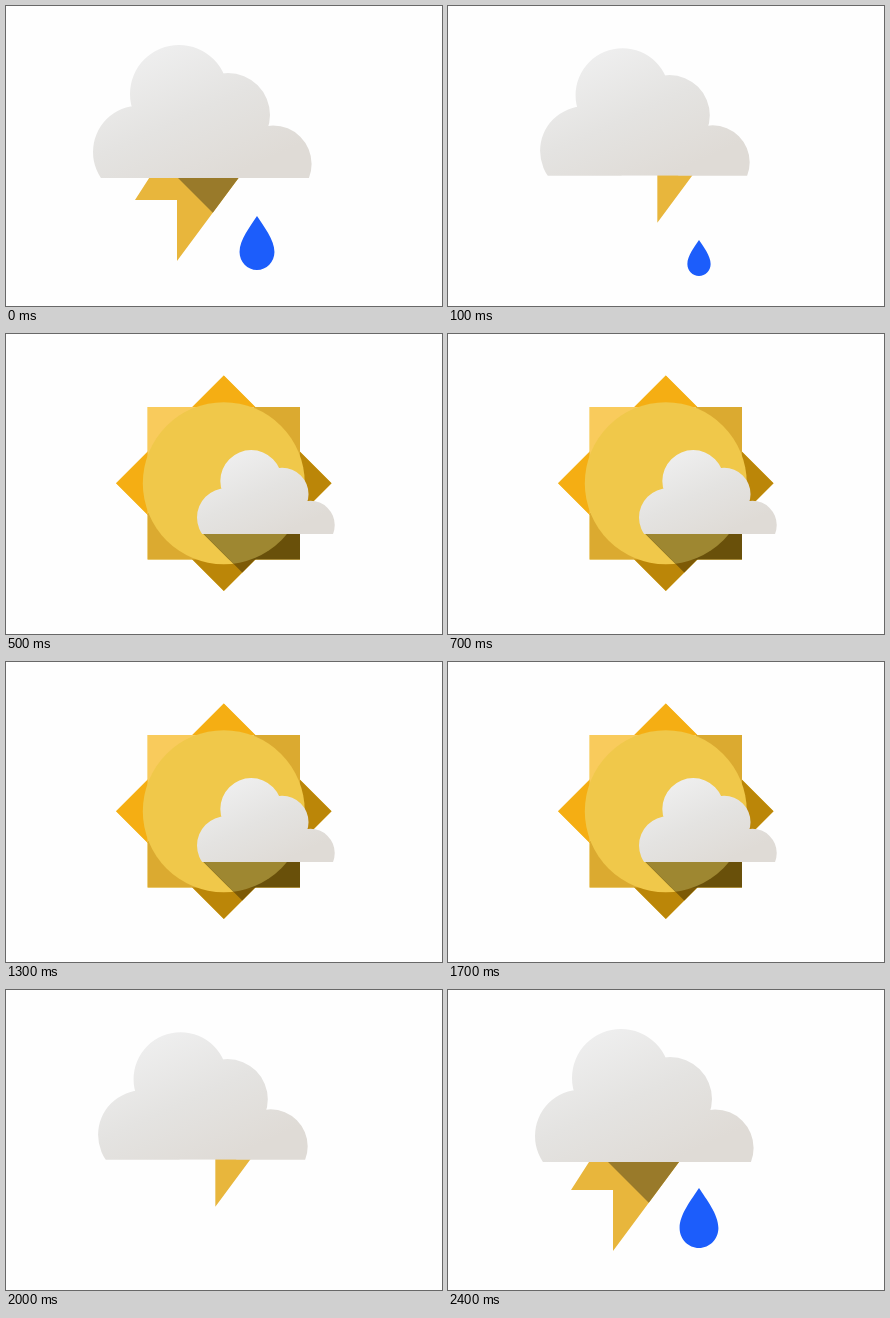
An HTML page with a canvas for the animation above (2.5 s loop, 436 by 300 pixels).

```html
<!DOCTYPE html>
<html lang="en">
<head>
<meta charset="utf-8">
<title>Weather icons</title>
<style>
html, body { margin: 0; width: 100%; height: 100%; overflow: hidden; background: #fefefe; }
canvas { display: block; width: 436px; height: 300px; }
</style>
</head>
<body>
<canvas id="stage" width="436" height="300"></canvas>
<script>
const ctx = document.getElementById('stage').getContext('2d');
const LOOP = 2500, STEP = 100;
const SUN = { x: 217.8, y: 149.2, r: 81, half: 76.2 };
const STORM = { x: 196.5, y: 105.5, scale: 1 };
const FAIR = { x: 260, y: 158, scale: 0.63 };

const mix = (a, b, k) => a + (b - a) * k;
const ramp = (v, a, b) => Math.min(1, Math.max(0, (v - a) / (b - a)));
const smooth = k => k * k * (3 - 2 * k);

function poly(points, fill) {
  ctx.beginPath();
  points.forEach(([x, y]) => ctx.lineTo(x, y));
  ctx.closePath();
  if (fill) { ctx.fillStyle = fill; ctx.fill(); }
}

function disc(x, y, r, fill) {
  ctx.beginPath();
  ctx.arc(x, y, r, 0, Math.PI * 2);
  ctx.fillStyle = fill;
  ctx.fill();
}

// Hard two-tone split along the diagonal.
function split(light, dark, p) {
  const h = SUN.half, g = ctx.createLinearGradient(-h, -h, h, h);
  g.addColorStop(p, light);
  g.addColorStop(p, dark);
  return g;
}

function star(scale, angle, back, front) {
  const h = SUN.half, d = h * Math.SQRT2;
  ctx.save();
  ctx.translate(SUN.x, SUN.y);
  ctx.rotate(angle);
  ctx.scale(scale, scale);
  poly([[0, -d], [d, 0], [0, d], [-d, 0]], back);
  poly([[-h, -h], [h, -h], [h, h], [-h, h]], front);
  ctx.restore();
}

function sun(u, pose) {
  const grow = ramp(u, 100, 400), rest = 1 - grow;
  if (!grow) return;
  const r = SUN.r * (1 - rest ** 3);
  const size = 1 - 0.855 * rest ** 2, angle = 0.93 * rest ** 2;
  const shade = ramp(u, 300, 400);
  ctx.save();
  ctx.globalAlpha = grow;
  star(size, angle, '#f2cb52', '#f2cb52');
  ctx.globalAlpha = shade;
  star(size, angle, split('#f5ae13', '#bb8608', 0.5), split('#f9cb5c', '#dbaa30', 0.35));
  ctx.globalAlpha = 1;
  disc(SUN.x, SUN.y, r, '#f0c84a');

  // Long shadow under the cloud, visible only on the sun.
  const x = pose.x - 99 * pose.scale, y = pose.y + 66.5 * pose.scale;
  poly([[x, y], [x + 140, y], [x + 140, y + 140]]);
  ctx.clip();
  ctx.globalAlpha = shade;
  star(size, angle, '#7d5a06', '#69500a');
  disc(SUN.x, SUN.y, r, '#9e8731');
  ctx.restore();
}

// Slides up along the diagonal until the cloud hides it.
function bolt(u, top) {
  const d = 6 * Math.exp(u / 50);
  if (d > 90) return;
  ctx.save();
  ctx.beginPath();
  ctx.rect(0, top, 436, 300);
  ctx.clip();
  ctx.translate(d, -d);
  poly([[165, 261], [165, 200], [123, 200], [187.3, 100], [284.4, 100]], '#e8b63c');
  ctx.clip();
  poly([[88, 100], [300, 100], [300, 312]], '#997a2a');
  ctx.restore();
}

// Falls steadily, largest one step before the loop ends.
function drop(t) {
  const w = (t < LOOP / 2 ? t : t - LOOP) / 100 + 1;
  const s = 1 - 0.1 * w * w;
  if (s <= 0) return;
  ctx.save();
  ctx.translate(251, 258 + 6 * w);
  ctx.scale(s, s);
  ctx.beginPath();
  ctx.moveTo(0, -60);
  ctx.bezierCurveTo(7, -49, 19.4, -34, 19.4, -20);
  ctx.bezierCurveTo(19.4, -9, 10.7, 0, 0, 0);
  ctx.bezierCurveTo(-10.7, 0, -19.4, -9, -19.4, -20);
  ctx.bezierCurveTo(-19.4, -34, -7, -49, 0, -60);
  ctx.fillStyle = '#1c5dfb';
  ctx.fill();
  ctx.restore();
}

function cloudPose(t, u) {
  const move = smooth(ramp(u, 85, 350));
  const shrink = ramp(u, 0, 300) ** 2;
  const swell = 0.015 * Math.sin(Math.PI * ramp(t, 2100, 2400));
  return {
    x: mix(STORM.x, FAIR.x, move),
    y: mix(STORM.y, FAIR.y, move),
    scale: mix(STORM.scale, FAIR.scale, shrink) + swell
  };
}

function cloud({ x, y, scale }) {
  ctx.save();
  ctx.translate(x, y);
  ctx.scale(scale, scale);
  ctx.translate(-STORM.x, -STORM.y);
  ctx.beginPath();
  ctx.rect(80, 30, 235, 142);
  ctx.clip();
  const g = ctx.createLinearGradient(160, 40, 220, 172);
  g.addColorStop(0, '#eeeeee');
  g.addColorStop(0.5, '#e4e3e1');
  g.addColorStop(1, '#dfdbd6');
  ctx.beginPath();
  [[133.5, 146, 46.5], [173, 88, 49], [222, 109, 42], [267, 158, 38.6]].forEach(([cx, cy, r]) => {
    ctx.moveTo(cx + r, cy);
    ctx.arc(cx, cy, r, 0, Math.PI * 2);
  });
  ctx.rect(134, 120, 124, 52);
  ctx.fillStyle = g;
  ctx.fill();
  ctx.restore();
}

function draw(now) {
  const t = Math.floor((now % LOOP) / STEP) * STEP;
  // Time into the change to sun; the change back runs the same way in reverse.
  const u = t < 1200 ? t : 2100 - t;
  const pose = cloudPose(t, u);
  ctx.fillStyle = '#fefefe';
  ctx.fillRect(0, 0, 436, 300);
  sun(u, pose);
  bolt(u, pose.y + 60 * pose.scale);
  drop(t);
  cloud(pose);
}

let start = null;
function tick(now) {
  if (start === null) start = now;
  draw(now - start);
  requestAnimationFrame(tick);
}
draw(0);
requestAnimationFrame(tick);
</script>
</body>
</html>
```
